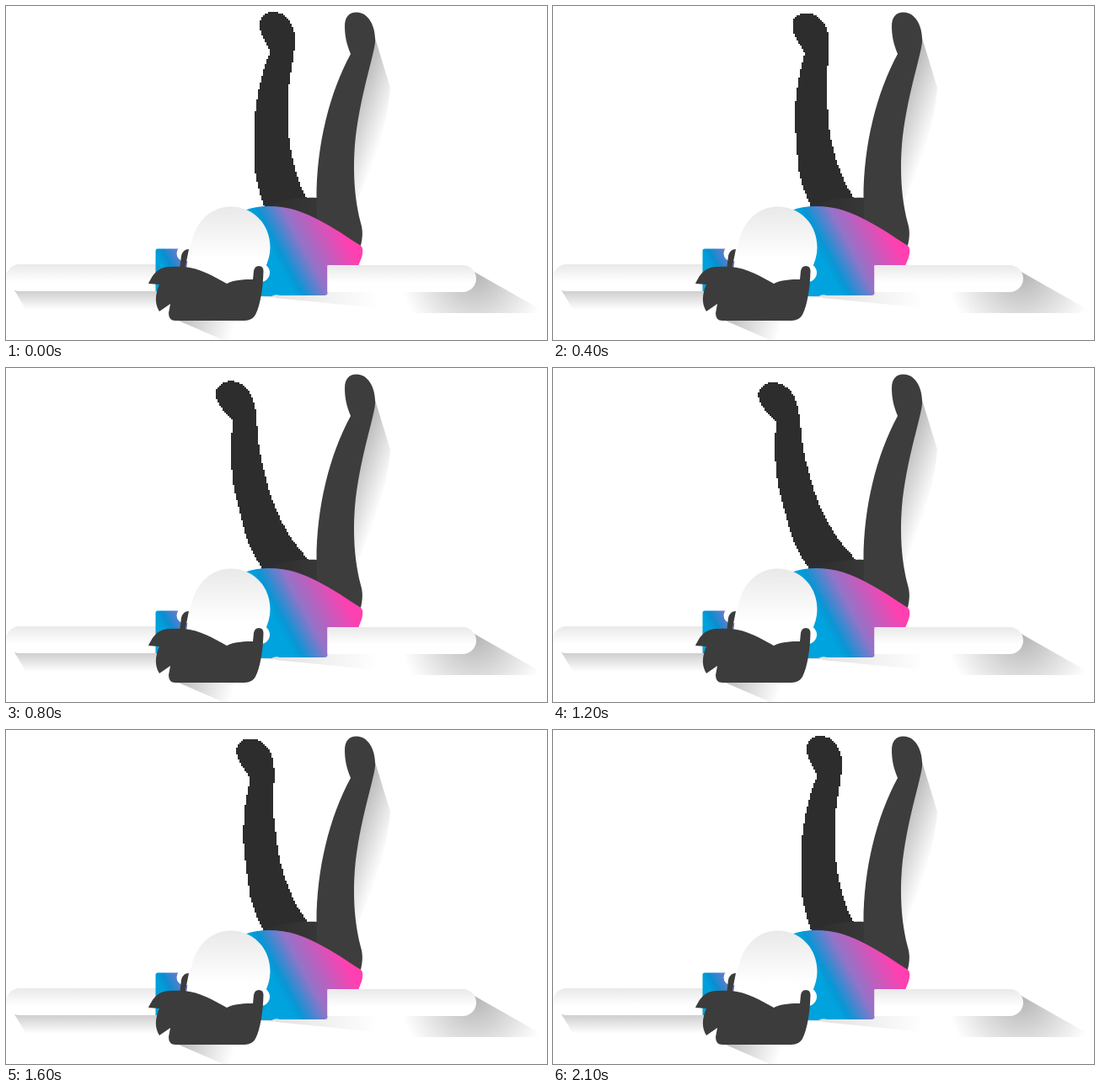
An HTML page with a canvas that plays this animation: 642x397 px, repeating every 2.3 s.

```html
<!DOCTYPE html>
<html lang="en">
<head>
<meta charset="utf-8">
<title>Lying figure swinging a leg</title>
<style>
  html, body { margin: 0; width: 100%; height: 100%; overflow: hidden; background: #fff; }
  canvas, svg { position: absolute; left: 0; top: 0; display: block; }
</style>
</head>
<body>
<canvas id="stage" width="642" height="397"></canvas>
<svg width="642" height="397" viewBox="0 0 642 397">
  <defs>
    <linearGradient id="shirt" gradientUnits="userSpaceOnUse" x1="305" y1="273" x2="384" y2="231">
      <stop offset="0" stop-color="#00a3dd"/>
      <stop offset=".1" stop-color="#0896d5"/>
      <stop offset=".4" stop-color="#9274c8"/>
      <stop offset=".95" stop-color="#ff40b0"/>
    </linearGradient>
    <linearGradient id="sleeve" gradientUnits="userSpaceOnUse" x1="183" y1="303" x2="212" y2="287">
      <stop offset="0" stop-color="#00a0dc"/>
      <stop offset=".25" stop-color="#0a8dd0"/>
      <stop offset="1" stop-color="#a070c8"/>
    </linearGradient>
    <linearGradient id="hip" gradientUnits="userSpaceOnUse" x1="305" y1="0" x2="410" y2="0">
      <stop offset="0" stop-color="#2d2d2d"/>
      <stop offset="1" stop-color="#3d3d3d"/>
    </linearGradient>
    <linearGradient id="skin" x2="0" y2="1">
      <stop offset="0" stop-color="#e9e9e9"/>
      <stop offset=".65" stop-color="#fff"/>
    </linearGradient>
    <linearGradient id="legShade" gradientUnits="userSpaceOnUse" x1="414" y1="108" x2="457" y2="123">
      <stop offset="0" stop-color="#b8b8b8"/>
      <stop offset="1" stop-color="#fdfdfd"/>
    </linearGradient>
    <linearGradient id="leftShade" gradientUnits="userSpaceOnUse" x1="0" y1="336" x2="0" y2="361">
      <stop offset="0" stop-color="#c8c8c8"/>
      <stop offset="1" stop-color="#fff"/>
    </linearGradient>
    <radialGradient id="handShade" gradientUnits="userSpaceOnUse" cx="556" cy="318" r="88">
      <stop offset="0" stop-color="#b4b4b4"/>
      <stop offset="1" stop-color="#fff"/>
    </radialGradient>
    <linearGradient id="bodyShade" gradientUnits="userSpaceOnUse" x1="300" y1="0" x2="440" y2="0">
      <stop offset="0" stop-color="#ddd"/>
      <stop offset="1" stop-color="#fff"/>
    </linearGradient>
    <linearGradient id="headShade" gradientUnits="userSpaceOnUse" x1="210" y1="371" x2="268" y2="390">
      <stop offset="0" stop-color="#c0c0c0"/>
      <stop offset="1" stop-color="#fff"/>
    </linearGradient>
  </defs>

  <!-- shadows -->
  <path fill="url(#legShade)" d="M430 38L438 38L456 97C453 140 436 190 417 232L400 180Z"/>
  <path fill="url(#leftShade)" d="M10 338L24 361H190V338Z"/>
  <path fill="url(#handShade)" d="M554 315L642 365H460V338H540Z"/>
  <path fill="url(#bodyShade)" d="M300 338H450V360L300 345Z"/>
  <path fill="url(#headShade)" d="M200 372L258 397H300L320 346Z"/>

  <!-- hips and still leg -->
  <path fill="url(#hip)" d="M304 239C322 231 345 227 369 228L410 240V290H320Z"/>
  <path fill="#3d3d3d" d="M368.500 228C368.500 165 384 103 409 57C404 45 402 35 402 24C402 13 407 7.500 416 7.500C430 7.500 439 24 438 43C436 62 419 110 414 165C411 205 415 235 421 258C424 268 423 276 421 285L369 260Z"/>

  <!-- arms and shirt -->
  <path fill="url(#skin)" d="M178 307H16A16 16 0 0 0 16 339H178Z"/>
  <path fill="url(#sleeve)" d="M180 288.500H220V339H177.500V291Q177.500 288.500 180 288.500Z"/>
  <path fill="url(#shirt)" d="M283 243C300 236 325 237 345 243C372 252 398 270 421 285Q425 288 422 299L418 309H381.500V341Q381.500 344 378 344H325Q320 342 315 345H270Z"/>
  <path fill="url(#skin)" d="M381.500 308H542A16 16 0 0 1 542 340H381.500Z"/>

  <!-- head -->
  <circle cx="212" cy="294" r="9.5" fill="#fff"/>
  <circle cx="302" cy="317" r="11" fill="#fff"/>
  <path fill="url(#skin)" d="M214 318C215 298 219 285 222 274C230 250 248 238.500 267 238.500C294 238.500 313.500 260 313.500 287C313.500 305 303 318 298 335H214Z"/>
  <path fill="#3c3c3c" d="M206 314L208 297Q210 289 217 289L212 314Z"/>
  <path fill="#3c3c3c" d="M169 330C175 318 180 310 196 310C225 308 240 318 262 330C272 325 284 325 293 325L294 315Q295 309 300 309Q305.500 309 305.500 315C305 335 302 355 296 367Q292 374 283 374H201Q193 374 193 365L195 354L182 363C177 355 176 345 182 331Z"/>
</svg>
<script>
const ctx = document.getElementById('stage').getContext('2d');
const leg = new Path2D('M309 245C302 226 295 205 295 185V140C296 110 304 78 313 56C313 47 301 38 301 22C301 12 309 7 317 7C332 7 343 22 343 40C343 58 335 85 335 110V145C337 175 344 205 357 229L362 242Z');
const LOOP = 2300, STEP = 100, PEAK = 1100, END = 2100;
const SWING = 15.6 * Math.PI / 180, HIP = { x: 327, y: 238 }, CELL = 2;

const ease = (u, power, bias) => {
  const rise = u ** power;
  return rise / (rise + bias * (1 - u) ** power);
};

function angleAt(t) {
  if (t >= END) return 0;
  return SWING * (t <= PEAK ? ease(t / PEAK, 2, .8) : ease((END - t) / (END - PEAK), 2.2, 1.12));
}

// The moving leg is sampled on a coarse grid, which gives its stepped edge.
function drawLeg(angle) {
  const cos = Math.cos(angle), sin = Math.sin(angle);
  ctx.clearRect(0, 0, 642, 397);
  ctx.fillStyle = '#2d2d2d';
  for (let y = 5; y < 239; y += CELL) {
    for (let x = 239; x < 361; x += CELL) {
      const dx = x + 1 - HIP.x, dy = y + 1 - HIP.y;
      if (ctx.isPointInPath(leg, HIP.x + dx * cos - dy * sin, HIP.y + dx * sin + dy * cos)) {
        ctx.fillRect(x, y, CELL, CELL);
      }
    }
  }
}

let shown = -1;
const start = performance.now();
function tick() {
  const t = (performance.now() - start) % LOOP;
  const step = Math.floor(t / STEP);
  if (step !== shown) drawLeg(angleAt(step * STEP));
  shown = step;
  requestAnimationFrame(tick);
}
tick();
</script>
</body>
</html>
```
